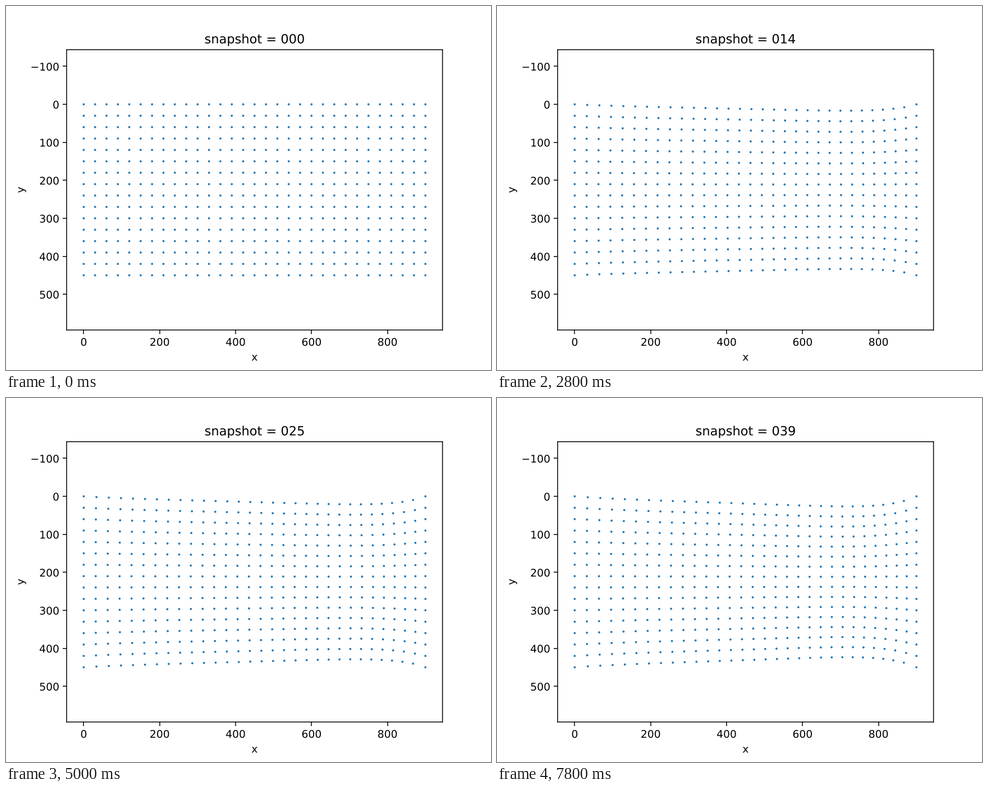
These frames come from a looping animation (864 px wide and 648 px high, 8 s). A matplotlib script:

```python
import numpy as np
import matplotlib.pyplot as plt
from matplotlib import patheffects
from matplotlib.animation import FuncAnimation

NX, NY, H = 31, 16, 30.0      # grid points and spacing
FRAMES, INTERVAL = 40, 200
NU = 0.3                      # Poisson ratio
PEAK_X, PEAK_Y = 19.0, 26.6   # largest displacements at the end


def element_matrices():
    """Stiffness and thermal load of a square plane-stress element."""
    sx = np.array([-1, 1, 1, -1])
    sy = np.array([-1, -1, 1, 1])
    d = np.array([[1, NU, 0], [NU, 1, 0], [0, 0, (1 - NU) / 2]]) / (1 - NU**2)
    gauss = 1 / np.sqrt(3)
    weight = H * H / 4
    stiff = np.zeros((8, 8))
    loads = []
    for xi in (-gauss, gauss):
        for eta in (-gauss, gauss):
            dx = sx * (1 + sy * eta) / (2 * H)
            dy = sy * (1 + sx * xi) / (2 * H)
            b = np.zeros((3, 8))
            b[0, 0::2] = dx
            b[1, 1::2] = dy
            b[2, 0::2] = dy
            b[2, 1::2] = dx
            stiff += weight * b.T @ d @ b
            loads.append((xi, weight * b.T @ d @ np.array([1, 1, 0])))
    return stiff, loads


def shrink_field():
    """Displacement of a sheet held at both ends, shrinking in proportion to x."""
    stiff, loads = element_matrices()
    size = 2 * NX * NY
    k = np.zeros((size, size))
    f = np.zeros(size)
    for j in range(NY - 1):
        for i in range(NX - 1):
            n = j * NX + i
            nodes = np.array([n, n + 1, n + NX + 1, n + NX])
            dofs = np.column_stack([2 * nodes, 2 * nodes + 1]).ravel()
            k[np.ix_(dofs, dofs)] += stiff
            for xi, load in loads:
                f[dofs] -= load * (i + (1 + xi) / 2) / (NX - 1)
    column = np.repeat(np.arange(NX * NY) % NX, 2)
    free = np.flatnonzero((column > 0) & (column < NX - 1))
    u = np.zeros(size)
    u[free] = np.linalg.solve(k[np.ix_(free, free)], f[free])
    u = u.reshape(NY, NX, 2)
    ux, uy = u[..., 0], u[..., 1]
    return ux * PEAK_X / ux[NY // 2].max(), uy * PEAK_Y / uy[0].max()


def amount(step, jump, rate):
    """Quick initial pull, then a steady creep."""
    return jump * (1 - np.exp(-step)) + rate * step


gx, gy = np.meshgrid(np.arange(NX) * H, np.arange(NY) * H)
ux, uy = shrink_field()

fig, ax = plt.subplots(figsize=(6.4, 4.8), dpi=135)
# One size per dot keeps their positions from being rounded to whole pixels.
dots = ax.scatter(gx.ravel(), gy.ravel(), s=np.ones(gx.size), linewidths=1,
                  color="C0")
ax.set_xlim(-45, 945)
half = 990 * (0.77 * 4.8) / (0.775 * 6.4) / 2
ax.set_ylim(225 + half, 225 - half)
ax.set_xticks(range(0, 801, 200))
ax.set_yticks(range(-100, 501, 100))
ax.set_xlabel("x")
ax.set_ylabel("y")
title = ax.set_title("snapshot = 000")

# Draw the frame and lettering at fractional pixel positions.
for spine in ax.spines.values():
    spine.set_snap(False)
for text in fig.findobj(plt.Text):
    text.set_path_effects([patheffects.Normal()])


def update(step):
    x = gx + ux * amount(step, 0.49, 0.0132)
    y = gy + uy * amount(step, 0.42, 0.0148)
    dots.set_offsets(np.column_stack([x.ravel(), y.ravel()]))
    title.set_text(f"snapshot = {step:03d}")
    return dots, title


anim = FuncAnimation(fig, update, frames=FRAMES, interval=INTERVAL,
                     repeat=True, repeat_delay=0, blit=False)
plt.show()
```
